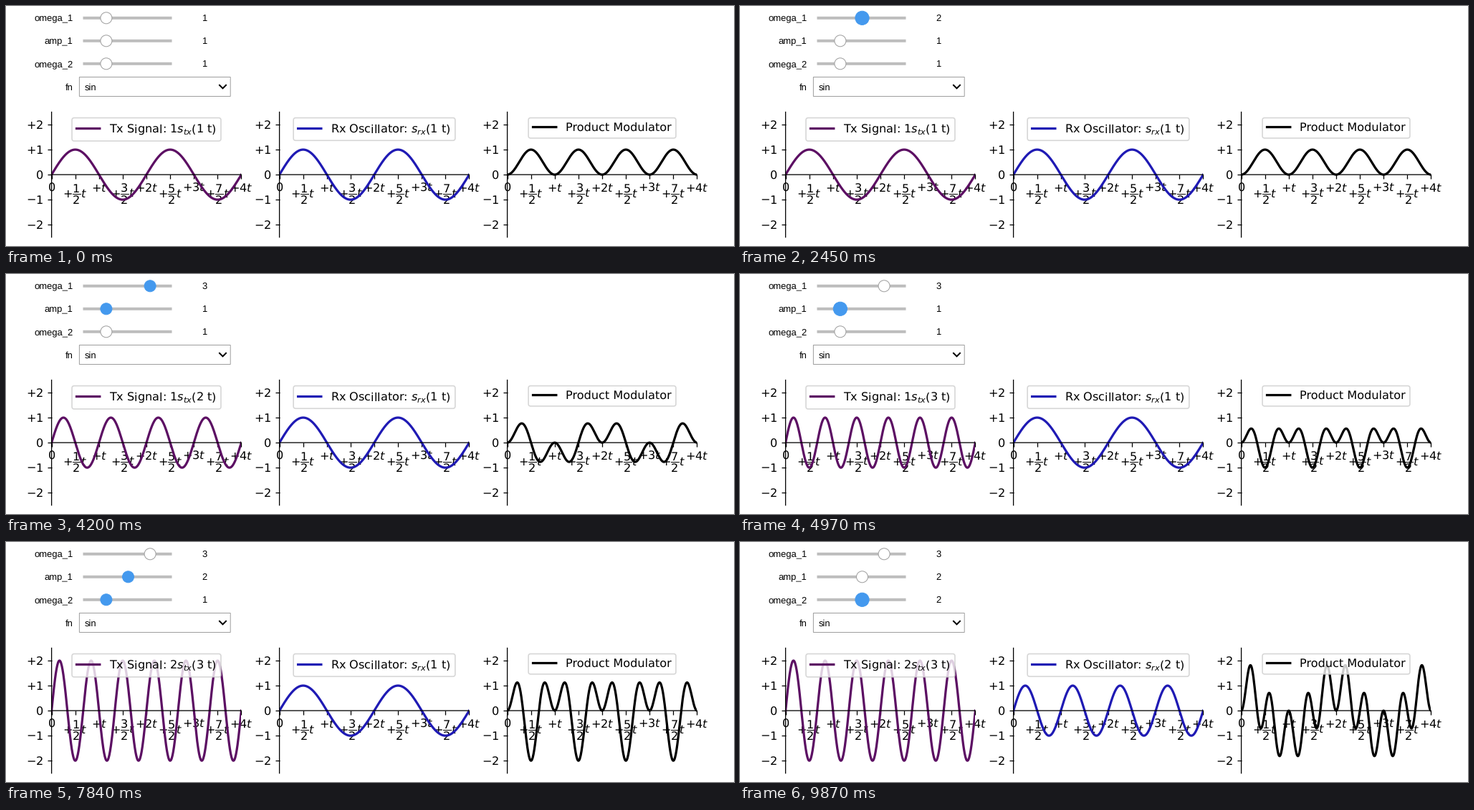
A matplotlib script that plays this animation: 1016 px wide and 336 px high, repeating every 9940 ms.

```python
import matplotlib.pyplot as plt
import numpy as np
from matplotlib.animation import FuncAnimation
from matplotlib.patches import Circle, Rectangle

W, H, DPI = 1016, 336, 100
PX = 72 / DPI           # points per pixel
K = 1.163               # scale of the plots relative to matplotlib defaults
INTERVAL, FRAMES = 70, 142

plt.rcParams.update({
    "font.family": "DejaVu Sans",
    "font.size": 10 * K,
    "text.hinting": "none",
    "path.snap": False,
    "axes.linewidth": 0.8 * K,
    "xtick.major.size": 3.5 * K, "ytick.major.size": 3.5 * K,
    "xtick.major.width": 0.8 * K, "ytick.major.width": 0.8 * K,
    "xtick.major.pad": 3.5 * K, "ytick.major.pad": 3.5 * K,
    "patch.linewidth": 1.0 * K,
    "lines.linewidth": 2 * K,
})

GREY, BORDER, BLUE = "#bdbdbd", "#9e9e9e", "#4499ee"
SLIDERS = ["omega_1", "amp_1", "omega_2"]
KNOB_RADIUS, PRESSED_SCALE = 8, 1.2

# Steps as (time in ms, value)
SLIDER_VALUES = {
    "omega_1": [(0, 1), (2170, 2), (3710, 3)],
    "amp_1": [(0, 1), (5530, 2)],
    "omega_2": [(0, 1), (8820, 2)],
}
PLOT_LAG = 630
ACTIVE = {
    "omega_1": (980, 4270),
    "amp_1": (4130, 7910),
    "omega_2": (7770, FRAMES * INTERVAL),
}


def step_value(name, time):
    return [v for start, v in SLIDER_VALUES[name] if start <= time or start == 0][-1]


fig = plt.figure(figsize=(W / DPI, H / DPI), dpi=DPI, facecolor="white")


# Control panel, in pixel coordinates
panel = fig.add_axes([0, 0, 1, 1])
panel.set(xlim=(0, W), ylim=(H, 0))
panel.axis("off")


def label(x, y, text, ha):
    return panel.text(x, y, text, ha=ha, va="baseline", color="black",
                      family="Liberation Sans", fontsize=13 * PX)


def make_slider(name, y):
    label(93.5, y + 4.5, name, "right")
    panel.add_patch(Rectangle((107.5, y - 2), 124, 4, fc=GREY, lw=0))
    knob = panel.add_patch(Circle((140, y), KNOB_RADIUS, lw=PX, zorder=3))
    return knob, label(277, y + 4.5, "1", "center")


sliders = {name: make_slider(name, 16.8 + 32 * i) for i, name in enumerate(SLIDERS)}
label(93.5, 118, "fn", "right")
panel.add_patch(Rectangle((102.4, 99.5), 210.8, 27, fc="white", ec=BORDER, lw=PX))
label(109.6, 118, "sin", "left")
panel.plot([298, 302.5, 307], [110.8, 115.3, 110.8], color="black", lw=2 * PX,
           solid_joinstyle="miter")


# Signal plots
def tick_label(half):
    if half == 0:
        return "$0$"
    if half % 2:
        return rf"$+\dfrac{{{half}}}{{2}}t$"
    return f"$+{half // 2 if half > 2 else ''}t$"


def make_plot(left, color, text):
    ax = fig.add_axes([left / W, 1 - 323.7 / H, 264.8 / W, 175.2 / H])
    ax.set(xlim=(0, 4), ylim=(-2.5, 2.5))
    ax.spines[["top", "right"]].set_visible(False)
    ax.spines["bottom"].set_position("zero")
    ax.set_xticks(np.arange(9) / 2, [tick_label(h) for h in range(9)])
    ax.set_yticks(range(-2, 3), ["$-2$", "$-1$", "$0$", "$+1$", "$+2$"])
    line, = ax.plot(t, 0 * t, color=color, label=text)
    legend = ax.legend(loc="upper center")
    return line, legend.get_texts()[0]


def tx_text(amp, omega):
    return f"Tx Signal: {amp}$s_{{tx}}$({omega} t)"


def rx_text(omega):
    return f"Rx Oscillator: $s_{{rx}}$({omega} t)"


t = np.linspace(0, 4, 500)
tx_line, tx_label = make_plot(63.6, "#5c0f63", tx_text(1, 1))
rx_line, rx_label = make_plot(381.6, "#1f1ab4", rx_text(1))
product_line, _ = make_plot(699.6, "black", "Product Modulator")


def update(frame):
    now = frame * INTERVAL
    active = [name for name, (start, end) in ACTIVE.items() if start <= now < end]
    for name, (knob, readout) in sliders.items():
        value = step_value(name, now)
        knob.set_center((109.3 + 30.6 * value, knob.center[1]))
        # A knob grows while it is held, not while focus passes to the next
        knob.set_radius(KNOB_RADIUS * (PRESSED_SCALE if active == [name] else 1))
        knob.set_facecolor(BLUE if name in active else "white")
        knob.set_edgecolor(BLUE if name in active else BORDER)
        readout.set_text(str(value))

    omega_1, amp, omega_2 = (step_value(name, now - PLOT_LAG) for name in SLIDERS)
    tx = amp * np.sin(np.pi * omega_1 * t)
    rx = np.sin(np.pi * omega_2 * t)
    tx_line.set_ydata(tx)
    rx_line.set_ydata(rx)
    product_line.set_ydata(tx * rx)
    tx_label.set_text(tx_text(amp, omega_1))
    rx_label.set_text(rx_text(omega_2))
    return []


anim = FuncAnimation(fig, update, frames=FRAMES, interval=INTERVAL,
                     repeat=True, repeat_delay=0, blit=False)
plt.show()
```
